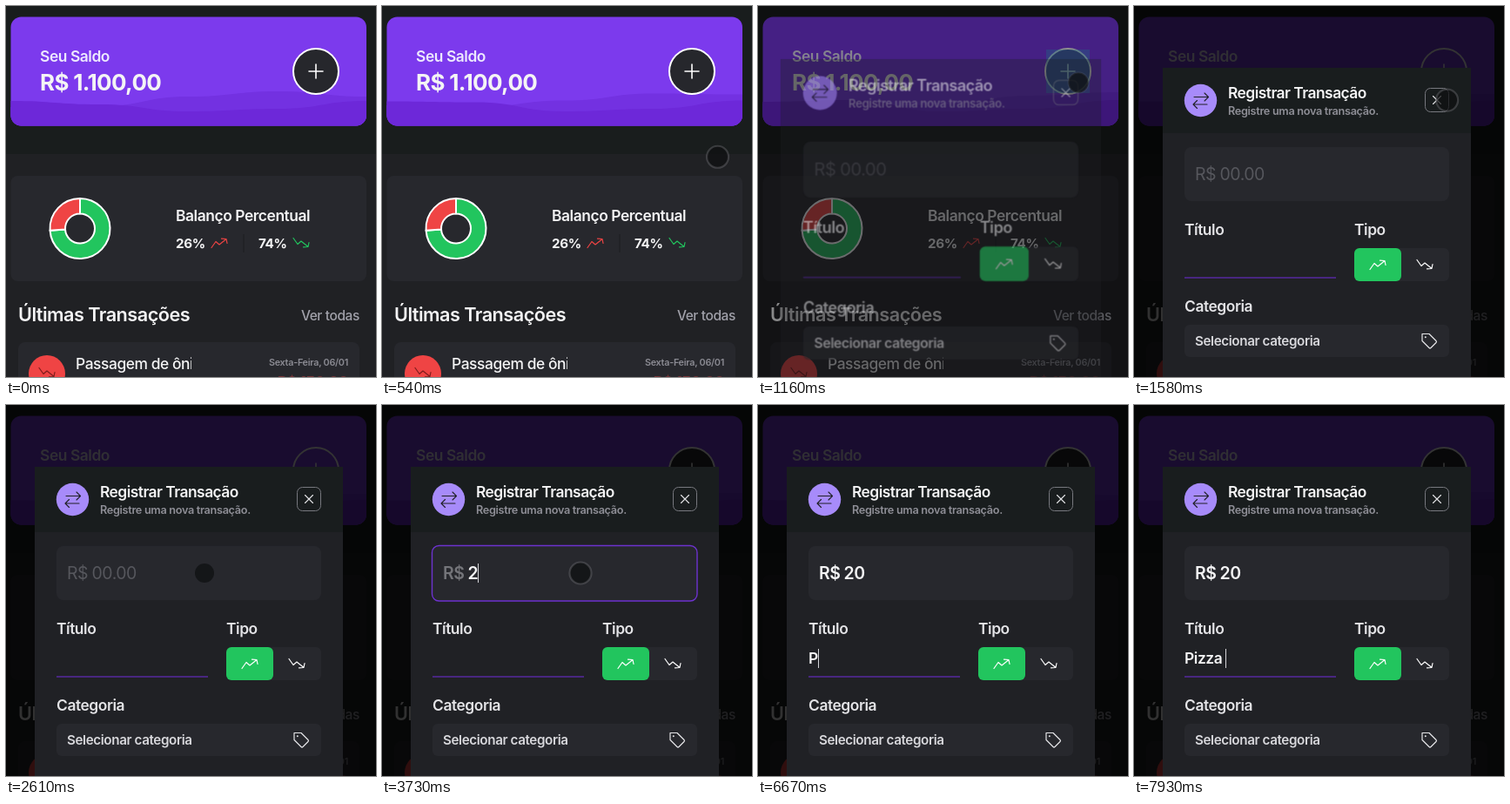
Animation, 425 px wide and 426 px high, one loop 8 s. Source, as an HTML page:

```html
<!DOCTYPE html>
<html lang="pt-BR">
<head>
<meta charset="utf-8">
<style>
  html, body { margin: 0; height: 100%; overflow: hidden; background: #202124; }
  svg { display: block; width: 425px; height: 426px; }
  text { font: 600 17.4px Inter, sans-serif; letter-spacing: -.025em; fill: #f4f4f5; white-space: pre; }
  .sm { font-size: 15.2px; }
  .lg { font-size: 19.5px; }
  .box { fill: #27282d; }
  .line { fill: none; stroke-width: 1.2; stroke-linecap: round; stroke-linejoin: round; }
  .label { fill: #e4e4e7; }
</style>
</head>
<body>
<svg viewBox="0 0 425 426">
  <defs>
    <clipPath id="cardClip"><rect x="5.5" y="12.5" width="408.5" height="125" rx="12"/></clipPath>
    <clipPath id="nameClip"><rect x="70" y="395" width="143" height="31"/></clipPath>
    <path id="up" class="line" d="M-9 5.500L-4-1.500 0 2 7.500-4M2.500-4.800 8-4.500 9 .5"/>
  </defs>

  <!-- dashboard -->
  <rect width="425" height="426" fill="#202124"/>
  <rect width="425" height="170" fill="#191d1d"/>
  <g clip-path="url(#cardClip)">
    <rect x="5" y="12" width="410" height="126" fill="#7c3aed"/>
    <path id="back" fill="#7331e1"/>
    <path id="front" fill="#6d28d9"/>
  </g>
  <text x="39" y="64" style="fill:#ede9fe">Seu Saldo</text>
  <text x="39" y="97" style="font-size:26px;font-weight:700">R$ 1.100,00</text>
  <circle id="plus" cx="356" cy="75" r="26" stroke="#fff" stroke-width="2"/>
  <path class="line" stroke="#fff" style="stroke-width:1.6" d="M348 75h16M356 67v16"/>
  <rect id="tap" x="331" y="50" width="50" height="50" fill="#33b5e5"/>

  <rect class="box" x="5.5" y="195" width="408.5" height="121" rx="8"/>
  <g stroke="#fff" stroke-width="2" stroke-linejoin="round">
    <path id="green" fill="#22c55e"/>
    <path id="red" fill="#ef4444"/>
  </g>
  <text x="195" y="247">Balanço Percentual</text>
  <text class="sm" x="195" y="278" style="font-weight:700">26%</text>
  <use href="#up" x="245" y="272" stroke="#ef4444"/>
  <path d="M273 262v21" stroke="#1c1d20"/>
  <text class="sm" x="290" y="278" style="font-weight:700">74%</text>
  <use href="#up" transform="translate(339 272) scale(1 -1)" stroke="#22c55e"/>

  <text x="14" y="362" style="font-size:21.7px">Últimas Transações</text>
  <text x="406" y="361" text-anchor="end" style="font-size:15.5px;font-weight:500;fill:#a1a1aa">Ver todas</text>
  <rect class="box" x="14" y="386" width="392" height="60" rx="8"/>
  <circle cx="47" cy="422" r="21" fill="#ef4444"/>
  <use href="#up" transform="translate(47 421) scale(1 -1)" stroke="#7f1d1d"/>
  <g clip-path="url(#nameClip)"><text x="80" y="417" style="font-weight:500">Passagem de ônibus</text></g>
  <text x="393" y="413" text-anchor="end" style="font-size:10.8px;fill:#8b8b93">Sexta-Feira, 06/01</text>
  <text x="393" y="438" text-anchor="end" opacity=".4" style="font-weight:700;fill:#ef4444">R$ 150,00</text>

  <rect id="shade" width="425" height="426"/>

  <!-- dialog -->
  <g id="modal">
    <g id="panel">
      <rect x="33" y="71" width="354" height="400" fill="#202125"/>
      <rect x="33" y="71" width="354" height="75" fill="#191d1e"/>
    </g>
    <g id="content">
      <circle cx="76.5" cy="108.5" r="18.7" fill="#a78bfa"/>
      <path class="line" stroke="#202125" style="stroke-width:1.1" d="M69 104.500H85.500M81 100l4.500 4.500-4.500 4.500M84 113H68M72.500 108.500L68 113l4.500 4.500"/>
      <text x="108" y="106" style="letter-spacing:-.03em">Registrar Transação</text>
      <text x="108" y="125" style="font-size:12.7px;fill:#8f8f97">Registre uma nova transação.</text>
      <rect x="334.500" y="94.500" width="27" height="27" rx="6" fill="none" stroke="#77787e"/>
      <path class="line" stroke="#e4e4e7" style="stroke-width:1.1" d="M343.500 103.500l9 9M352.500 103.500l-9 9"/>

      <rect class="box" x="58" y="162" width="304" height="62" rx="8"/>
      <rect id="focus" x="57.500" y="161.500" width="304.500" height="63.500" rx="8" fill="none" stroke="#6d32cf" stroke-width="1.4"/>
      <text id="prefix" class="lg" x="70" y="200">R$</text>
      <text id="hint" class="lg" x="98.500" y="200" style="font-weight:400;fill:#56575d">00.00</text>
      <text id="amount" class="lg" x="98.500" y="200"></text>

      <text class="label" x="58" y="263">Título</text>
      <text id="title" x="58" y="297"></text>
      <path d="M58 312H232" stroke="#56299f" stroke-width="1.600"/>

      <text class="label" x="253" y="263">Tipo</text>
      <rect class="box" x="253" y="278" width="109" height="38" rx="6"/>
      <rect x="253" y="278" width="54" height="38" rx="6" fill="#22c55e"/>
      <use href="#up" x="280" y="297" stroke="#fff"/>
      <use href="#up" transform="translate(334 297) scale(1 -1)" stroke="#fff"/>

      <text class="label" x="58" y="351">Categoria</text>
      <rect class="box" x="58" y="366" width="304" height="37" rx="6"/>
      <text class="sm" x="70" y="390" style="fill:#d8d8dc">Selecionar categoria</text>
      <path class="line" stroke="#e4e4e7" d="M331 376.500h8l8 8q1 1 0 2l-6 6q-1 1-2 0l-8-8z"/>
      <circle cx="334.800" cy="380.300" r="1" fill="#e4e4e7"/>
      <rect id="caret" width="1" height="22" fill="#d4d4d8"/>
    </g>
  </g>

  <circle id="touch" fill="#0e0f11" fill-opacity=".72" stroke="#8a8a8e" stroke-width="2.200"/>
</svg>
<script>
const LOOP = 8000;
const $ = id => document.getElementById(id);
const clamp = v => Math.min(1, Math.max(0, v));
const ramp = (t, start, length) => clamp((t - start) / length);
const smooth = v => v * v * (3 - 2 * v);
const mix = (a, b, v) => a + (b - a) * v;
const set = (id, attrs) => {
  for (const key in attrs) $(id).setAttribute(key, attrs[key]);
};
const blend = (a, b, v) => `rgb(${a.map((c, i) => Math.round(mix(c, b[i], v)))})`;

// Each edit: time, field, value; the caret blink restarts with it
const EDITS = [
  [2700, 'amount', ''], [3730, 'amount', '2'], [4430, 'amount', '20'],
  [5900, 'title', ''], [6670, 'title', 'P'], [6950, 'title', 'Pi'],
  [7090, 'title', 'Piz'], [7300, 'title', 'Pizz'], [7510, 'title', 'Pizza'],
  [7720, 'title', 'Pizza ']
];

// Start, duration, then start, control and end points of a curve
const MOVES = [
  [70, 740, 404, 395, 402, 225, 368, 88],
  [1400, 660, 368, 88, 356, 143, 228, 193],
  [5330, 220, 228, 193, 198, 248, 168, 302]
];

function slice(from, to) {
  const at = (r, turn) => {
    const a = turn * 2 * Math.PI;
    return `${85 + r * Math.sin(a)} ${255.5 - r * Math.cos(a)}`;
  };
  const big = to - from > .5 ? 1 : 0;
  return `M${at(34.5, from)}A34.5 34.5 0 ${big} 1 ${at(34.5, to)}L${at(17, to)}A17 17 0 ${big} 0 ${at(17, from)}Z`;
}
set('green', { d: slice(0, .74) });
set('red', { d: slice(.74, 1) });

function wave(id, low, high, v) {
  const step = 102.25, ys = low.map((y, i) => mix(y, high[i], v));
  let d = `M5 140V${ys[0]}`;
  for (let i = 1; i < ys.length; i++) {
    const x = 5 + i * step, mid = x - step / 2;
    d += `C${mid} ${ys[i - 1]} ${mid} ${ys[i]} ${x} ${ys[i]}`;
  }
  set(id, { d: d + 'V140Z' });
}

function drawPage(t) {
  const v = (1 - Math.cos(t / 1090 * Math.PI)) / 2;
  wave('back', [116, 115, 104, 98, 104], [112, 117, 113, 103, 99], v);
  wave('front', [109, 113, 121, 118, 109], [110, 108, 121, 118, 108], v);
  const hover = ramp(t, 1090, 150) - ramp(t, 2610, 360);
  set('plus', { fill: blend([38, 39, 44], [124, 58, 237], hover) });
  set('tap', { opacity: t < 940 ? 0 : .4 * (1 - ramp(t, 1180, 220)) });
}

function drawModal(t) {
  const open = 1 - (1 - ramp(t, 1090, 300)) ** 3;
  const scale = 1 + .09 * (1 - open);
  set('shade', { opacity: .8 * open });
  set('modal', { transform: `translate(210 322) scale(${scale}) translate(-210 -322)` });
  set('panel', { opacity: open * open });
  set('content', { opacity: open });
  set('focus', { opacity: ramp(t, 2610, 200) - ramp(t, 5850, 200) });
  $('prefix').style.fill = blend([86, 87, 93], [244, 244, 245], ramp(t, 3715, 85));
  $('prefix').style.fontWeight = t < 3730 ? 400 : 600;
}

function drawInput(t) {
  const values = { amount: '', title: '' };
  let last;
  for (const edit of EDITS) {
    if (edit[0] > t) break;
    last = edit;
    values[edit[1]] = edit[2];
  }
  for (const id in values) $(id).textContent = values[id];
  set('hint', { opacity: values.amount ? 0 : 1 });
  if (!last || (t - last[0]) % 1060 >= 530) return set('caret', { opacity: 0 });
  const field = $(last[1]);
  set('caret', {
    opacity: 1,
    x: Math.round(+field.getAttribute('x') + (last[2] ? field.getComputedTextLength() : 0)),
    y: last[1] === 'amount' ? 182 : 280
  });
}

function drawTouch(t) {
  const [start, length, x0, y0, cx, cy, x1, y1] = MOVES.findLast(m => t >= m[0]) || MOVES[0];
  const u = smooth(ramp(t, start, length)), w = 1 - u;
  const curve = (a, b, c) => w * w * a + 2 * u * w * b + u * u * c;
  const press = Math.max(...[1050, 2610, 5830].map(p => clamp(2 - Math.abs(t - p) / 80)));
  set('touch', {
    cx: curve(x0, cx, x1),
    cy: curve(y0, cy, y1),
    r: 12.5 - 1.5 * press,
    'stroke-opacity': .33 * (1 - press),
    opacity: t < 70 ? 0 : 1 - ramp(t, 5900, 200)
  });
}

function frame() {
  const t = performance.now() % LOOP;
  drawPage(t);
  drawModal(t);
  drawInput(t);
  drawTouch(t);
  requestAnimationFrame(frame);
}
frame();
</script>
</body>
</html>
```
